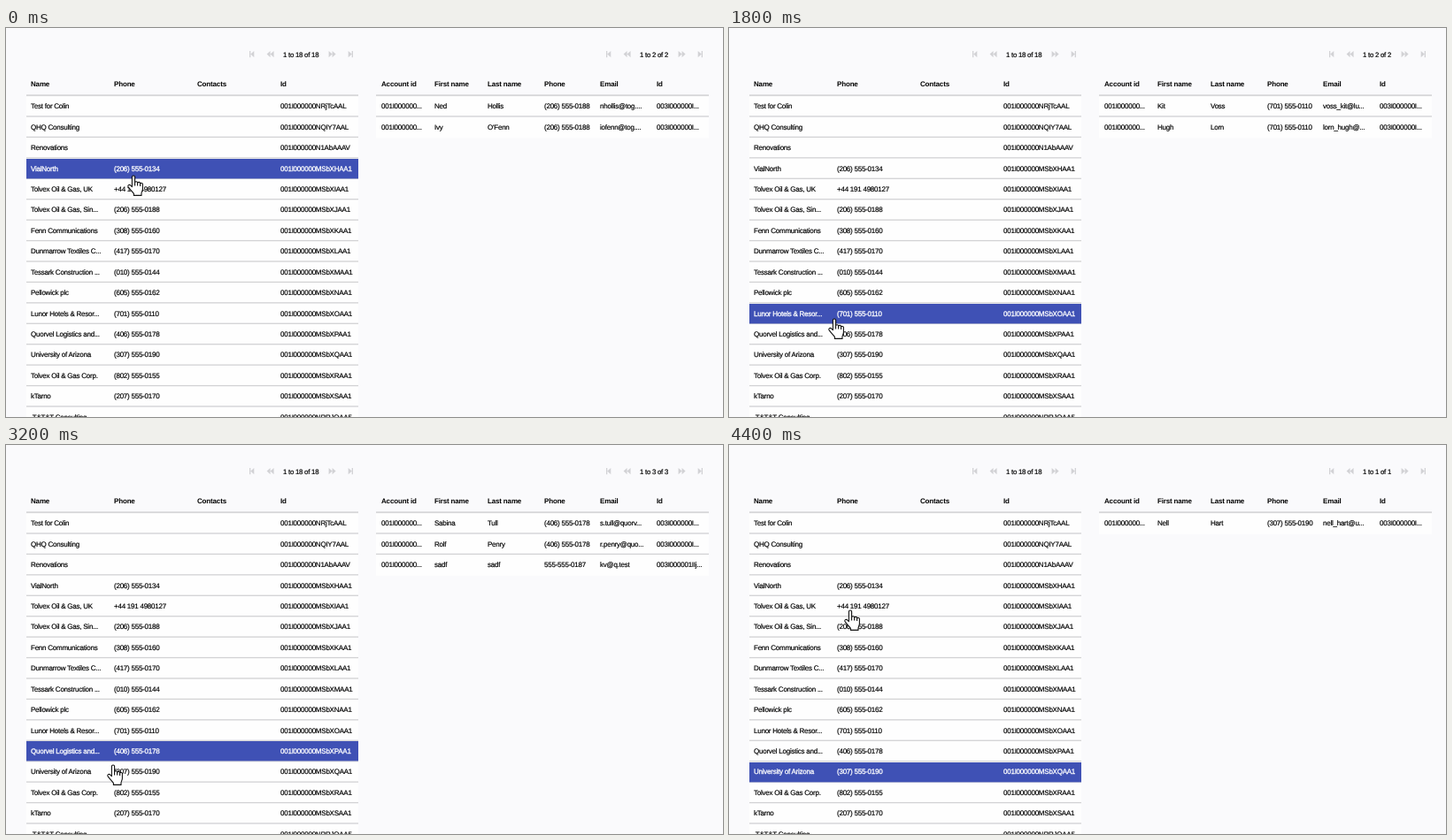
Recreate the animation shown at these times as an HTML page. Size 810 by 440 pixels, loop 4600 ms.

```html
<!DOCTYPE html>
<html lang="en">
<head>
<meta charset="utf-8">
<title>Accounts and contacts</title>
<style>
  html, body { margin: 0; width: 100%; height: 100%; overflow: hidden; background: #fafafc; }
  svg { display: block; width: 810px; height: 440px; }
  text {
    font: 8px "Liberation Sans", Arial, sans-serif; letter-spacing: -0.24px;
    text-rendering: geometricPrecision; white-space: pre;
    fill: #000; stroke: #000; stroke-width: 0.18px;
  }
  .picked { fill: #fff; stroke: #fff; stroke-width: 0.3px; }
  .head { font-weight: bold; letter-spacing: -0.16px; stroke: none; }
  .pager { font-size: 7.8px; }
  .icon { fill: #d2d2d5; }
</style>
</head>
<body>
<svg id="stage" viewBox="0 0 810 440"></svg>
<script>
const LOOP = 4600, STEP = 200;
const TOP = 76.5, PITCH = 23.43;

const accounts = [
  ["Test for Colin", "", "NRjTcAAL"],
  ["QHQ Consulting", "", "NQIY7AAL"],
  ["Renovations", "", "N1AbAAAV"],
  ["VialNorth", "(206) 555-0134", "MSbXHAA1"],
  ["Tolvex Oil & Gas, UK", "+44 191 4980127", "MSbXIAA1"],
  ["Tolvex Oil & Gas, Sin...", "(206) 555-0188", "MSbXJAA1"],
  ["Fenn Communications", "(308) 555-0160", "MSbXKAA1"],
  ["Dunmarrow Textiles C...", "(417) 555-0170", "MSbXLAA1"],
  ["Tessark Construction ...", "(010) 555-0144", "MSbXMAA1"],
  ["Pellowick plc", "(605) 555-0162", "MSbXNAA1"],
  ["Lunor Hotels & Resor...", "(701) 555-0110", "MSbXOAA1"],
  ["Quorvel Logistics and...", "(406) 555-0178", "MSbXPAA1"],
  ["University of Arizona", "(307) 555-0190", "MSbXQAA1"],
  ["Tolvex Oil & Gas Corp.", "(802) 555-0155", "MSbXRAA1"],
  ["kTarno", "(207) 555-0170", "MSbXSAA1"],
  [" T&T&T Consulting", "", "NRRJOAA5"]
].map(([name, phone, id]) => [name, phone, "", "001I000000" + id]);

const contact = (first, last, phone, email, id = "003I000000I...") =>
  ["001I000000...", first, last, phone, email, id];

const contactSets = {
  oil: [
    contact("Ned", "Hollis", "(206) 555-0188", "nhollis@tog...."),
    contact("Ivy", "O'Fenn", "(206) 555-0188", "iofenn@tog....")
  ],
  vial: [contact("Orla", "Brant", "(206) 555-0134", "obrant@vial...")],
  hotels: [
    contact("Kit", "Voss", "(701) 555-0110", "voss_kit@lu..."),
    contact("Hugh", "Lorn", "(701) 555-0110", "lorn_hugh@...")
  ],
  logistics: [
    contact("Sabina", "Tull", "(406) 555-0178", "s.tull@quorv..."),
    contact("Rolf", "Penry", "(406) 555-0178", "r.penry@quo..."),
    contact("sadf", "sadf", "555-555-0187", "kv@q.test", "003I000001IIj...")
  ],
  university: [contact("Nell", "Hart", "(307) 555-0190", "nell_hart@u...")]
};

const left = { x: 23, width: 375, cols: [28, 122, 216, 310], heads: ["Name", "Phone", "Contacts", "Id"] };
const right = {
  x: 418, width: 376, cols: [424, 484, 544, 608, 671, 735],
  heads: ["Account id", "First name", "Last name", "Phone", "Email", "Id"]
};

// Each track lists [start ms, value]; values hold until the next entry.
const selection = [[0, 3], [1400, 10], [2600, 11], [3400, 12]];
const details = [[0, "oil"], [400, "vial"], [1800, "hotels"], [2800, "logistics"], [3800, "university"]];
const pointer = [
  [0, [137, 166]], [800, [116, 318]], [1000, [112, 328]], [2000, [112, 348]], [2400, [113, 349]],
  [3000, [114, 357]], [3200, [114, 361]], [3600, [115, 350]], [3800, [113, 326]],
  [4000, [133, 192]], [4200, [130, 186]]
];
const valueAt = (track, time) => track.filter(([start]) => start <= time).pop()[1];

const stage = document.getElementById("stage");

function add(tag, attrs, content = "") {
  const node = document.createElementNS("http://www.w3.org/2000/svg", tag);
  for (const key in attrs) node.setAttribute(key, attrs[key]);
  node.textContent = content;
  stage.append(node);
}

const rect = (x, y, width, height, fill) => add("rect", { x, y, width, height, fill });

function drawTable({ x, width, cols, heads }, rows, selected = -1) {
  heads.forEach((label, i) => add("text", { x: cols[i], y: 66, class: "head" }, label));
  rect(x, TOP, width, rows.length * PITCH + 1, "#fefefe");
  rect(x, TOP - 1.2, width, 1.8, "#d6d6d8");
  for (let i = 1; i < rows.length; i++) rect(x, TOP + i * PITCH - 0.6, width, 1.3, "#d2d2d4");
  if (selected >= 0) rect(x, Math.round(TOP + selected * PITCH) + 1, width, 22.4, "#3f51b5");
  rows.forEach((row, r) => {
    const y = Math.round(TOP + (r + 0.5) * PITCH) + 3;
    const style = r === selected ? "picked" : "cell";
    row.forEach((value, c) => value && add("text", { x: cols[c], y, class: style }, value));
  });
}

function drawPager(x, count, width) {
  const icon = d => add("path", { d, class: "icon" });
  const arrow = (tip, dir) => `M${tip} 29.6l${4 * dir} -3.6v7.2z`;
  const end = x + width;
  icon(`M${x - 38} 26h1.3v7.2h-1.3z` + arrow(x - 36.7, 1));
  icon(arrow(x - 18.4, 1) + arrow(x - 14.4, 1));
  add("text", { x, y: 33, class: "pager" }, `1 to ${count} of ${count}`);
  icon(arrow(end + 15.6, -1) + arrow(end + 19.6, -1));
  icon(arrow(end + 37.7, -1) + `M${end + 37.7} 26h1.3v7.2h-1.3z`);
}

function drawHand([x, y]) {
  add("path", {
    transform: `translate(${x} ${y})`,
    d: "M5.4 13.6V2.6a1.6 1.6 0 0 1 3.2 0V9a1.5 1.5 0 0 1 3 .5a1.5 1.5 0 0 1 3 .8a1.4 1.4 0 0 1 2.8 1V16" +
       "c0 2.2-1.4 3.4-1.4 5.2V23.4H7.4V21.4C5.6 18.8 2.8 16.4 1 13.6C.2 12 2 10.6 3.5 11.8z" +
       "M8.6 9v3.4M11.6 9.5v3M14.6 10.3v2.6",
    fill: "#fff", stroke: "#111", "stroke-width": 1.1, "stroke-linejoin": "round"
  });
}

function draw(time) {
  const contacts = contactSets[valueAt(details, time)];
  stage.replaceChildren();
  drawPager(313, 18, 40);
  drawPager(716, contacts.length, 32);
  drawTable(left, accounts, valueAt(selection, time));
  drawTable(right, contacts);
  drawHand(valueAt(pointer, time));
}

const begin = performance.now();
let shown = -1;

function tick() {
  const step = Math.floor(((performance.now() - begin) % LOOP) / STEP);
  if (step !== shown) draw((shown = step) * STEP);
  requestAnimationFrame(tick);
}
tick();
</script>
</body>
</html>
```
